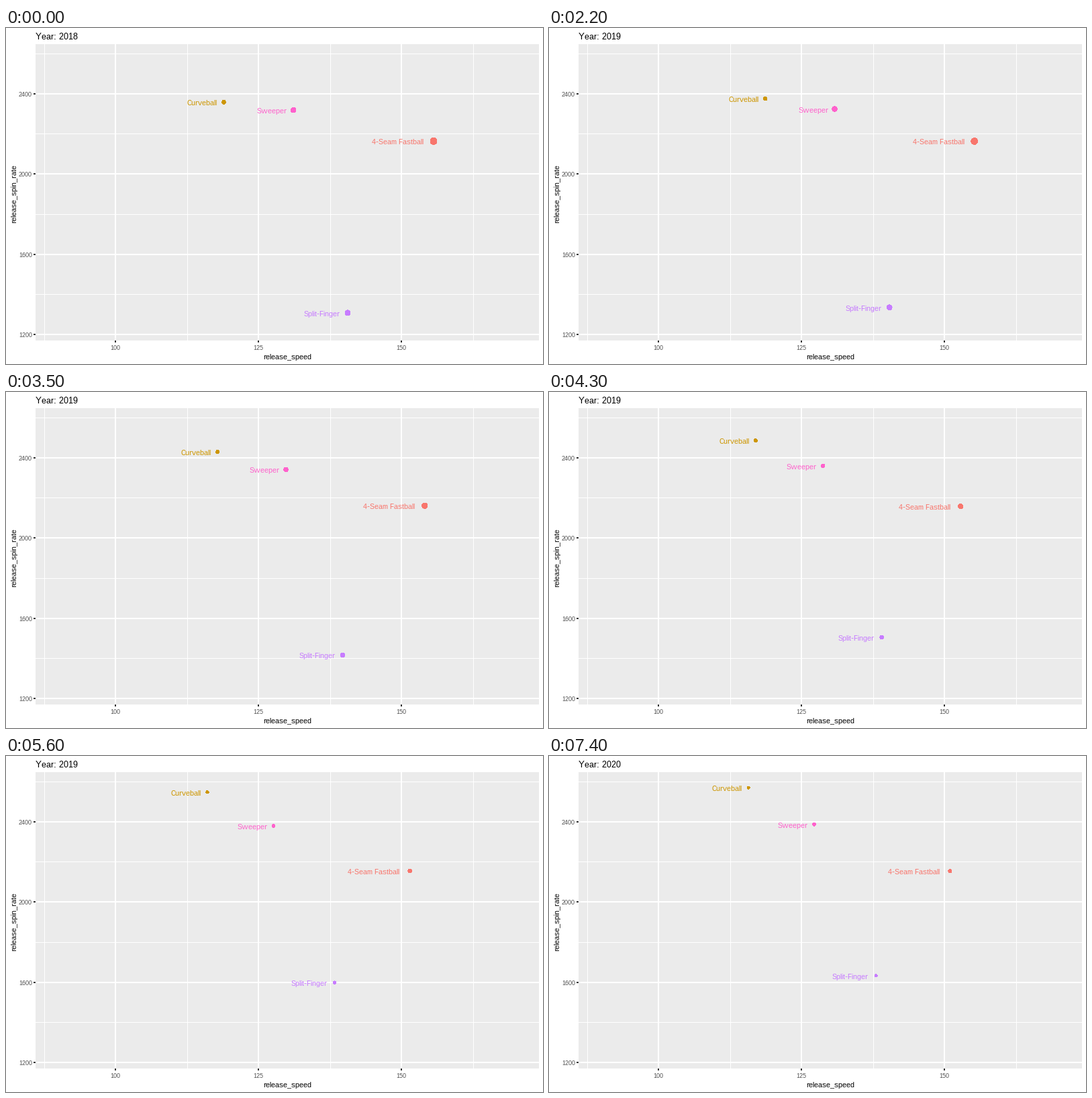
Write a matplotlib script that moves like this. It is 800 px wide and 500 px high and loops after 8000 ms.

```python
import matplotlib.pyplot as plt
from matplotlib.animation import FuncAnimation
from matplotlib.patches import Circle, Rectangle

# Pixel-fitted text with whole-pixel advances and no kerning
plt.rcParams.update({
    "font.family": "Liberation Sans",
    "text.hinting": "native",
    "text.hinting_factor": 1,
    "text.kerning_factor": 6,
})

W, H, DPI = 800, 500, 100
FRAMES, INTERVAL = 80, 100
LEFT, RIGHT, TOP, BOTTOM = 44, 794, 24, 465

# label, colour, start (x, y, diameter), end (x, y, diameter), label offset
PITCHES = [
    ("4-Seam Fastball", "#F8766D", (637, 168.2, 10), (597.4, 171.4, 5), -92.2),
    ("Curveball", "#CD9600", (324.5, 110.3, 5.5), (297, 47, 4), -54.8),
    ("Split-Finger", "#C77CFF", (509, 423.9, 8), (487, 326.7, 4), -65.3),
    ("Sweeper", "#FF61CC", (428.2, 122.2, 7.6), (395, 101.8, 4.4), -54.4),
]

fig = plt.figure(figsize=(W / DPI, H / DPI), dpi=DPI, facecolor="white")
ax = fig.add_axes([0, 0, 1, 1])
ax.set(xlim=(0, W), ylim=(H, 0))
ax.axis("off")


def box(x, y, w, h, color, z=1):
    ax.add_patch(Rectangle((x, y), w, h, fc=color, lw=0, aa=False, zorder=z))


def text(x, y, s, px=11, color="black", ha="left", **kw):
    # the small extra keeps the size from truncating below a whole pixel
    return ax.text(x, y, s, size=px * 72 / DPI + 0.01, color=color,
                   ha=ha, va="baseline", zorder=5, **kw)


def ease(u):
    """Cubic in-out."""
    return 4 * u**3 if u < 0.5 else 1 - 4 * (1 - u)**3


def draw_panel():
    box(LEFT, TOP, RIGHT - LEFT, BOTTOM - TOP, "#EBEBEB", 0)
    for x in (57, 270, 483, 696):
        box(x, TOP, 1, BOTTOM - TOP, "white")
    for y in (38, 157, 277, 396):
        box(LEFT, y, RIGHT - LEFT, 1, "white")
    for x, name in ((163, "100"), (376, "125"), (589, "150")):
        box(x - 1, TOP, 2, BOTTOM - TOP, "white", 2)
        box(x - 1, BOTTOM, 2, 3, "#333333", 2)
        text(x, 479, name, 9, "#4D4D4D", "center")
    for y, name in ((98, "2400"), (217, "2000"), (337, "1600"), (456, "1200")):
        box(LEFT, y - 1, RIGHT - LEFT, 2, "white", 2)
        box(LEFT - 3, y - 1, 3, 2, "#333333", 2)
        text(39, y + 4, name, 9, "#4D4D4D", "right")
    text(419, 493, "release_speed", ha="center")
    text(15, 246, "release_spin_rate", ha="center",
         rotation=90, rotation_mode="anchor")


draw_panel()
title = text(LEFT, 17, "", 13)
dots, labels = [], []
for name, color, start, _, _ in PITCHES:
    dots.append(ax.add_patch(
        Circle(start[:2], start[2] / 2, fc=color, lw=0, aa=False, zorder=4)))
    labels.append(text(0, 0, name, color=color))


def update(i):
    u = i / FRAMES
    k = ease(u)
    title.set_text(f"Year: {round(2018 + 2 * u)}")
    for (_, _, start, end, dx), dot, label in zip(PITCHES, dots, labels):
        x, y, d = (a + (b - a) * k for a, b in zip(start, end))
        dot.set_center((x, y))
        dot.set_radius(d / 2)
        label.set_position((x + dx, y + 5))
    return [title, *dots, *labels]


anim = FuncAnimation(fig, update, frames=FRAMES, interval=INTERVAL, repeat=True)
plt.show()
```
